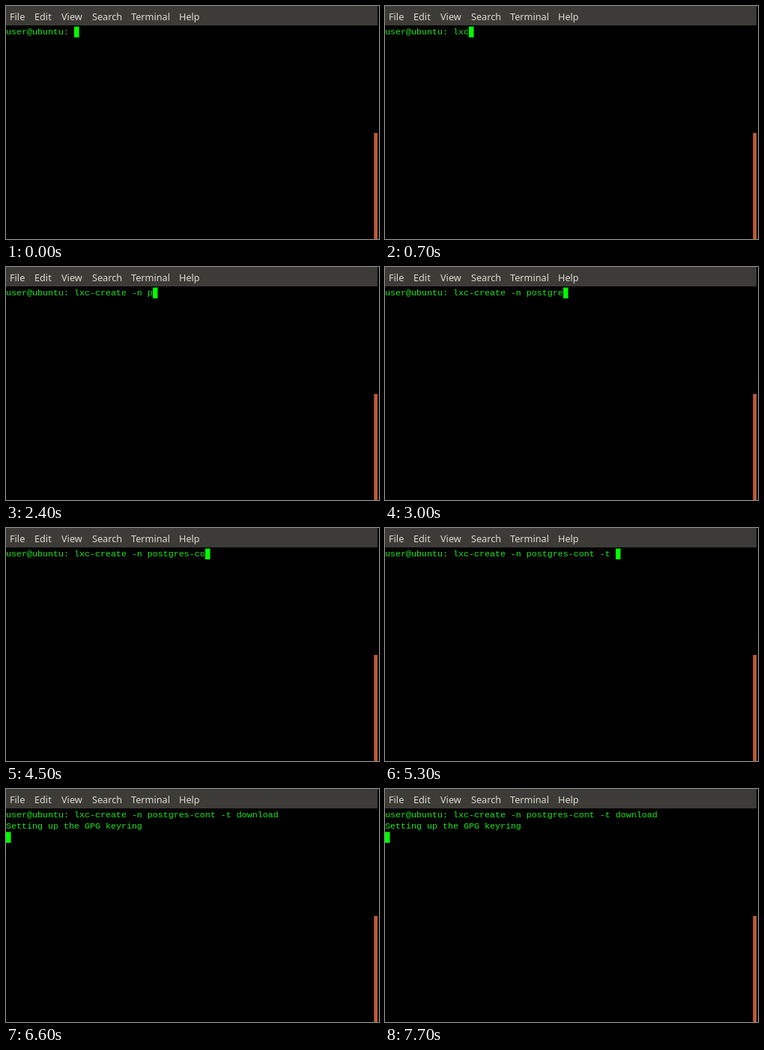
An HTML page for the animation above (8000 ms loop, 498 px wide and 312 px high).

```html
<!DOCTYPE html>
<html lang="en">
<head>
<meta charset="utf-8">
<title>Terminal</title>
<style>
  html, body { margin: 0; width: 100%; height: 100%; overflow: hidden; background: #000; }
  #stage { position: relative; width: 498px; height: 312px; overflow: hidden; background: #000; }
  #stage > * { position: absolute; box-sizing: border-box; }
  #menu { left: 0; top: 0; width: 496px; height: 26px; background: #3c3b37; }
  #menu span {
    position: absolute; top: 5px; line-height: 18px; color: #dfdbd2;
    font-family: "Noto Sans", "Open Sans", sans-serif; font-size: 12.7px;
  }
  #screen {
    left: 0; top: 28px; margin: 0; color: #1ee61e; white-space: pre;
    font: 11.665px/15px "Liberation Mono", monospace;
  }
  #cursor {
    width: 7px; height: 15px; background: #0f0;
    border: solid #008000; border-width: 1px 1px 0 0;
  }
  #bar {
    left: 491px; top: 170px; width: 5px; height: 142px;
    background: #bb5b38; border-left: 1px solid #8a4228;
  }
</style>
</head>
<body>
<div id="stage">
  <div id="menu"></div>
  <div id="bar"></div>
  <pre id="screen"></pre>
  <div id="cursor"></div>
</div>
<script>
const LOOP = 8000, TICK = 100, CELL = 7, ROW = 15, TOP = 27;
const PROMPT = 'user@ubuntu: ';
const REPLY = 'Setting up the GPG keyring';
const ENTER = 6500, BLINK = 600;

// bursts of typing: start, text, number of screen updates it is spread over
const BURSTS = [
  [500, 'lxc-c', 5], [1100, 'reat', 4], [1700, 'e ', 1], [2000, '-', 1],
  [2200, 'n ', 1], [2400, 'post', 3], [2800, 'g', 1], [3000, 're', 1],
  [4000, 's', 1], [4400, '-co', 2], [4700, 'nt ', 2], [5200, '-t download', 7]
];
const MENU = { File: 5, Edit: 38, View: 74, Search: 115, Terminal: 167, Help: 231 };

const byId = id => document.getElementById(id);
const between = (t, a, b) => t >= a && t < b;
const screenEl = byId('screen'), cursor = byId('cursor');

for (const [label, x] of Object.entries(MENU)) {
  const item = document.createElement('span');
  item.textContent = label;
  item.style.left = x + 'px';
  byId('menu').append(item);
}

function typedAt(t) {
  return BURSTS.map(([start, text, steps]) => {
    const step = Math.floor((t - start) / TICK) + 1;
    const part = Math.min(1, Math.max(0, step / steps));
    return text.slice(0, Math.floor(text.length * part));
  }).join('');
}

// blinks off just before the first key, before Enter, then at a steady pace
function cursorOn(t) {
  if (t >= ENTER) return Math.floor((t - ENTER) / BLINK) % 2 === 0;
  return !between(t, 400, 500) && !between(t, 6300, ENTER);
}

function draw(t) {
  const done = t >= ENTER + TICK;
  const line = PROMPT + typedAt(t);
  const text = done ? line + '\n' + REPLY : line;
  if (screenEl.textContent !== text) screenEl.textContent = text;
  cursor.style.left = (done ? 0 : line.length * CELL) + 'px';
  cursor.style.top = TOP + (done ? 2 * ROW : 0) + 'px';
  cursor.style.visibility = cursorOn(t) ? 'visible' : 'hidden';
}

const start = performance.now();
function tick() {
  draw((performance.now() - start) % LOOP);
  requestAnimationFrame(tick);
}
draw(0);
requestAnimationFrame(tick);
</script>
</body>
</html>
```
